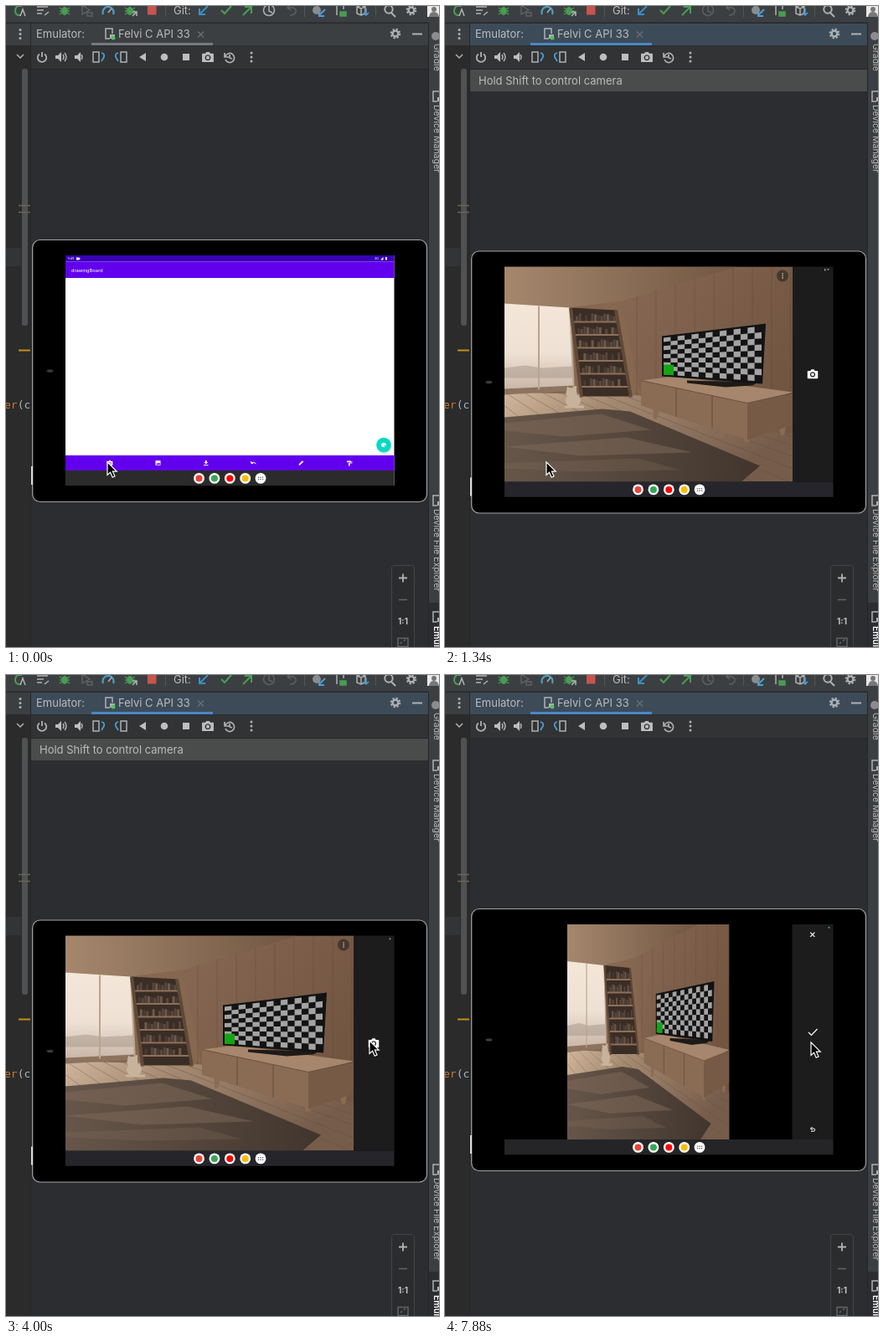
Write an HTML page that moves like this. It is 517 by 766 pixels and loops after 8000 ms.

```html
<!DOCTYPE html>
<html lang="en">
<head>
<meta charset="utf-8">
<title>Emulator camera</title>
<style>
html, body { margin: 0; width: 517px; height: 766px; overflow: hidden; background: #2b2d30 }
svg { display: block; font: 13px Inter, sans-serif }
.line { fill: none; stroke: #afb1b3; stroke-width: 1.5 }
.tiny { font: 4px Roboto, sans-serif; fill: #fff }
.side { font-size: 10.5px; fill: #bbb }
</style>
</head>
<body>
<svg width="517" height="766" viewBox="0 0 517 766">
<defs>
  <linearGradient id="ceilFill" x2="1"><stop stop-color="#a5876d"/><stop offset="1" stop-color="#705642"/></linearGradient>
  <linearGradient id="wallFill" x2="1" y2=".4"><stop stop-color="#8d6f58"/><stop offset=".5" stop-color="#826450"/><stop offset="1" stop-color="#735642"/></linearGradient>
  <linearGradient id="skyFill" x2="0" y2="1"><stop stop-color="#f4e6d8"/><stop offset=".55" stop-color="#eee1d4"/><stop offset="1" stop-color="#c4b2a2"/></linearGradient>
  <linearGradient id="floorFill" x2="1" y2=".4"><stop stop-color="#d0b69b"/><stop offset=".35" stop-color="#a58a72"/><stop offset="1" stop-color="#765d4b"/></linearGradient>
  <linearGradient id="rugFill" x2="1"><stop stop-color="#66564a"/><stop offset="1" stop-color="#41352d"/></linearGradient>
  <clipPath id="frame"><path d="M0 0H344V257H0z"/></clipPath>
  <clipPath id="rugEdge"><path id="rug" d="M0 180L117 170 150 173 305 238 283 257H0z"/></clipPath>

  <g id="gear" fill="none" stroke="#afb1b3">
    <circle r="5.3" stroke-width="2" stroke-dasharray="2.2 1.96"/>
    <circle r="3.4" stroke-width="2.4"/>
  </g>
  <path id="cam" fill-rule="evenodd" d="M-7-5h3.5l1.5-2h4l1.5 2H7q1 0 1 1V6q0 1-1 1H-7q-1 0-1-1V-4q0-1 1-1zM0-3.2a4 4 0 1 0 .01 0zM0-1.6a2.4 2.4 0 1 1-.01 0z"/>
  <g id="phone"><path class="line" d="M3 0V-6H-5V6H0" stroke-width="1.4"/><path d="M0 1h6v5H0z" fill="#afb1b3"/></g>
  <g id="bug" fill="#499c54"><ellipse cy="1" rx="3.6" ry="5"/><path d="M-6-3L6 5M-6 5L6-3M-6 1H6" stroke="#499c54" stroke-width="1.3"/></g>

  <g id="room" clip-path="url(#frame)">
    <path d="M0 0H344V257H0z" fill="url(#wallFill)"/>
    <path d="M0 0H277L140 41 78 49 0 44z" fill="url(#ceilFill)"/>
    <path d="M78 49L140 41 163 156H80z" fill="#86674f"/>
    <g id="planks" stroke="#4f3a2c" stroke-opacity=".22"/>
    <path d="M0 150L163 154 344 200V257H0z" fill="url(#floorFill)"/>
    <g id="boards" stroke="#5d4737" stroke-opacity=".35"/>
    <path d="M0 44L78 49 83 147 0 152z" fill="url(#skyFill)"/>
    <path d="M0 121l25-3 20 3 36-2v14H0z" fill="#aa9b8f" opacity=".55"/>
    <path d="M0 146L83 142V148L0 153z" fill="#8c735f"/>
    <path d="M41 47V147M78 49L83 148" stroke="#b9a48f" stroke-width="2"/>
    <path d="M79 49L133 52 151 155H91z" fill="#3a2d25"/>
    <g id="shelves"/>
    <path d="M79 49L92 156M133 52L151 156" stroke="#5f4938" stroke-width="4"/>
    <g fill="#c7b39c"><ellipse cx="82" cy="160" rx="9" ry="8"/><circle cx="80" cy="151" r="6.5"/><path d="M74 149l1-6 4 3zM81 145l5-3v7zM72 166h23v3H72z"/></g>
    <use href="#rug" fill="url(#rugFill)"/>
    <g clip-path="url(#rugEdge)" fill="#806b5b" opacity=".5">
      <path d="M0 187L115 176 175 195 70 203 0 196zM0 215L145 204 225 222 90 226z"/>
      <path d="M0 235L160 229 210 243 90 245 0 241z" opacity=".6"/>
    </g>
    <path d="M177 164h10l-5 18h-4zM254 183l10 3-3 19h-4zM281 190h16l-5 20h-5zM326 186h11l-3 15h-4z" fill="#8b6b53"/>
    <path d="M163 136L203 131 344 150 290 167z" fill="#a6866c"/>
    <path d="M163 136L290 163V207L163 166z" fill="#8a6b54"/>
    <path d="M290 163L344 151V189L290 207z" fill="#765a46"/>
    <path d="M163 136L290 163 344 151M205 145v34M248 154v39" fill="none" stroke="#614838" stroke-width=".8"/>
    <path d="M218 136l80 2q6 1-3 4l-31 2-46-5z" fill="#1e1a18"/>
    <path d="M188 83L312 68 308 140 188 131z" fill="#131313"/>
    <path id="checker" fill="#a3a3a3"/>
    <path d="M190 117l12 .3V130l-12-1z" fill="#12a612"/>
  </g>
</defs>

<!-- IDE chrome -->
<path d="M0 0H517V766H0z" fill="#2c2d30"/>
<path d="M0 0H517V20H0zM504 20h13V766h-13zM30 21H504V47H30z" fill="#3c3f41"/>
<path id="header" d="M30 21H504V47H30z"/>
<path d="M30 48H504V75H30z" fill="#313335"/>
<path d="M0 20H504M29.5 20V766M504.5 20V766M30 75.5H504" stroke="#252628"/>
<path d="M0 21H29V766H0z" fill="#2b2b2b"/>
<path d="M0 21H29V47H0z" fill="#3c3f41"/>
<path d="M0 289H18V311H0z" fill="#333435"/>
<rect x="19" y="75" width="7" height="307" rx="3" fill="#505152"/>
<path d="M15 238.5H29M15 246.5H29" stroke="#6c6650" stroke-width="1.6"/>
<path d="M15 411.5H29" stroke="#be9117" stroke-width="2"/>
<path class="line" d="M13 58l4 4 4-4"/>
<g id="dots" fill="#afb1b3"><circle cx="17" cy="28.5" r="1.5"/><circle cx="17" cy="33.5" r="1.5"/><circle cx="17" cy="38.5" r="1.5"/></g>
<use href="#dots" x="276" y="27.5"/>
<text x="-2" y="481" fill="#cc7832" style="font:13px 'DejaVu Sans Mono',monospace">er<tspan fill="#a9b7c6">(c</tspan></text>

<!-- main toolbar -->
<g class="line">
  <path d="M19 0H14Q11 2 11 6t4 5h2" stroke="#499c54" stroke-width="2"/><path d="M17 12l3-8 3 8"/>
  <path d="M37 1H50M37 5H45M37 9H43M46 11l5-4"/>
  <path d="M91-1V10l9-5z" stroke="#5d6062"/><path d="M97 8h6v4h-6z" stroke="#5d6062"/>
  <path d="M116 10A6.5 6.5 0 1 1 128 10" stroke="#4a9fc5" stroke-width="2.2"/><path d="M122 8l4-5"/>
  <path d="M241 0L232 9M231 3v7h7" stroke="#3a8fc7" stroke-width="2"/>
  <path d="M257 5l4 4 8-9" stroke="#499c54" stroke-width="2.2"/>
  <path d="M283 11L292 2M285 1h8v8" stroke="#499c54" stroke-width="2"/>
  <g id="clock"><circle cx="314" cy="5" r="6.5"/><path d="M314 0V6l4 2"/></g>
  <path d="M339-2l-3 4 4 3M336 2h6q5 1 4 5-1 4-7 4" stroke="#5d6062"/>
  <path d="M381 4l-7 7M374 6v6h6" stroke="#4a9fd5" stroke-width="2"/>
  <path d="M395 11V-1h8V4"/><path d="M399 7h7v5h-7z" fill="#499c54" stroke="#499c54"/>
  <path d="M419 1l5-2 5 2v8l-5 2-5-2zM419 1l5 2 5-2M424 3v8"/><path d="M430 3v8m-3-3l3 3 3-3" stroke="#4a9fd5"/>
  <circle cx="457" cy="4" r="4.7" stroke-width="2"/><path d="M460 8l5 5" stroke-width="2"/>
  <path d="M190.5 0V13M356.5 0V13M441.5 0V13" stroke="#555" stroke-width="1"/>
</g>
<use href="#bug" x="70" y="5"/><use href="#bug" x="148" y="5"/>
<path d="M151 12l5-5m-5 0h5v5" class="line"/>
<path d="M169 0h10.500v10.500H169z" fill="#c75450"/>
<circle cx="371" cy="5" r="5" fill="#8a8d90"/>
<text x="200" y="10" fill="#bbb">Git:</text>
<use href="#gear" x="484" y="5"/>
<path d="M503 0h14v13h-14z" fill="#e9e9e9"/><circle cx="511" cy="4" r="3" fill="#777"/><path d="M505 13q1-6 6-6t6 6z" fill="#777"/>

<!-- tool window header -->
<g fill="#bbb"><text x="36" y="38">Emulator:</text><text x="134" y="38">Felvi C API 33</text></g>
<use href="#phone" x="124" y="33"/><circle cx="128" cy="38" r="2.5" fill="#4fc45a"/>
<path d="M229 30.500l7 7m0-7l-7 7" class="line" style="stroke:#6e7173;stroke-width:1.2"/>
<path id="underline" d="M102 44H247V47H102z"/>
<use href="#gear" x="465" y="33"/>
<path d="M485 33.500H497" class="line" style="stroke-width:2"/>

<!-- emulator buttons -->
<g class="line">
  <path d="M40 57.500a5.200 5.200 0 1 0 6 0M43 55v6" stroke-width="1.8"/>
  <path d="M68 58q2 3 0 6M70 56q4 5 0 10M90 58q2 3 0 6"/>
  <path d="M104 55h7v12h-7zM137 55h7v12h-7z"/>
  <path d="M114 56q4 1 3 5l-3 5M134 56q-4 1-3 5l3 5" stroke="#4a9fd5" stroke-width="1.8"/>
  <path d="M261 56v5h5M262 60a5.500 5.500 0 1 1 0 4M267 58v4l3 1" stroke-width="1.7"/>
</g>
<g fill="#bcbec0">
  <path d="M59 59h3l4-4v12l-4-4h-3zM82 59h3l4-4v12l-4-4h-3zM159 61l8-5v10z"/>
  <circle cx="189" cy="61" r="4.300"/><path d="M211 57h8v8h-8z"/>
  <use href="#cam" transform="translate(241 61) scale(.87)"/>
</g>
<g id="notice"><path d="M30 76H504V102H30z" fill="#4a4c4b"/><text x="40" y="94" fill="#bbb">Hold Shift to control camera</text></g>

<!-- right tool strip -->
<path d="M505 713h12V766h-12z" fill="#2b2d30"/>
<circle cx="513" cy="36" r="5" fill="#8a8d90"/>
<use href="#phone" x="515" y="108"/><use href="#phone" x="515" y="591"/><use href="#phone" x="515" y="730"/>
<g class="side">
  <text transform="translate(510.500 45) rotate(90)">Gradle</text>
  <text transform="translate(510.500 118) rotate(90)">Device Manager</text>
  <text transform="translate(510.500 601) rotate(90)">Device File Explorer</text>
  <text transform="translate(510.500 741) rotate(90)" fill="#fff" font-weight="600">Emulator</text>
</g>

<!-- zoom panel -->
<rect x="460.500" y="668.500" width="27" height="110" rx="3" fill="#2b2c2e" stroke="#424446"/>
<g class="line"><path d="M469 683.500H479M474 678.500V688.500" stroke-width="1.800"/><path d="M469 709.500H479M468 755.500h12v10h-12zM471 762l2-2m2-1l2-2" stroke="#626466"/></g>
<text x="474" y="739" text-anchor="middle" fill="#c4c4c4" style="font-size:10px;font-weight:700">1:1</text>

<!-- tablet -->
<g id="tablet">
  <rect x="31.700" y="279.500" width="470.800" height="313" rx="9" stroke="#a3a3a3" stroke-width="1.200"/>
  <path d="M30 550h2v22h-2z" fill="#ddd"/>
  <ellipse cx="52.500" cy="436" rx="4" ry="1.800" fill="#3a3a3a"/>
  <g id="app">
    <path d="M71 298H463.500V573H71z" fill="#fff"/>
    <path d="M71 298H463.500V305.500H71z" fill="#3700b3"/>
    <path d="M71 305.500H463.500V325H71zM71 537H463.500V555H71z" fill="#6200ee"/>
    <text x="78" y="317.500" class="tiny" style="font-size:6.100px">drawingBoard</text>
    <text x="73.500" y="303.300" class="tiny">9:49</text><text x="440" y="303.300" class="tiny">3G</text>
    <path d="M84 300.500h3l2 1.500-2 1.500h-3zM447 303.500l3.500-3.500v3.500zM453 300h2v3.500h-2z" fill="#fff"/>
    <circle cx="451.500" cy="526" r="9" fill="#000" opacity=".15"/><circle cx="451" cy="524.500" r="8.800" fill="#03dac5"/>
    <circle cx="451" cy="524.500" r="2.800" fill="#fff"/><circle cx="452.500" cy="525.800" r="1" fill="#03dac5"/>
    <g fill="#fff">
      <use href="#cam" transform="translate(124 546) scale(.42)"/>
      <path d="M178.500 543.300h6v5.400h-6zM236 548.200h5.500v1H236zM238 543h1.600v2h1.600l-2.400 2.500-2.400-2.500h1.600zM349.500 549l.5-2 4-3.800 1.300 1.300-4 4zM407 543.500h5v1.800h-5zM409 546h1.700v3.500H409zM412.500 544h.8v2.500h-3.800v-.8h3z"/>
      <path d="M179.300 548l1.500-2 1 1 1-1.500 1.500 2.500z" fill="#6200ee"/>
      <path d="M293 546q3-2 5.500 1M292.800 544v2.500h2.500" fill="none" stroke="#fff"/>
    </g>
  </g>
  <path id="dark" d="M71 298H463.500V555H71z" fill="#1c1c1c"/>
  <g id="splash"><use href="#cam" transform="translate(267 426) scale(1.060)" fill="#454545"/><path d="M452.500 300h2v3h-2z" fill="#aaa"/></g>
  <g id="preview">
    <use href="#room" transform="translate(71 298)"/>
    <circle cx="403" cy="309" r="7" fill="#3b2f27" opacity=".8"/>
    <path d="M402.500 306h1.200v1.200h-1.200zM402.500 308.400h1.200v1.200h-1.200zM402.500 310.800h1.200v1.200h-1.200z" fill="#fff"/>
    <use href="#cam" transform="translate(439 426.300) scale(.78)" fill="#fff"/>
  </g>
  <g id="review">
    <path d="M71 298H414.500V555H71z"/>
    <use href="#room" transform="translate(146 298) scale(.5625 1)"/>
    <path d="M436.200 307.700l5.200 5.200m0-5.200l-5.200 5.200M434 427l3.500 3.500 7-7.500" fill="none" stroke="#fff" stroke-width="1.200"/>
    <path d="M438.500 540l-2 2 2 2M436.500 542h3.500q1.700 0 1.700 1.600t-1.700 1.600h-3" fill="none" stroke="#fff"/>
  </g>
  <path id="status" d="M453 300.500h1.500v2.500H453zM456.500 300.500h2v1.500h-2z" fill="#9a9a9a"/>
  <circle id="active" cx="458.500" cy="301.800" r="1" fill="#2fbf8a"/>
  <path id="taskbar" d="M71 555H463.500V573.300H71z"/>
  <g id="launcher"/>
</g>
<path id="cursor" d="M0 0V15.500L3.600 12.200 6.200 18.200 9 17 6.400 11.200H11.200z" stroke="#fff" stroke-width="1.200"/>
</svg>
<script>
const $ = id => document.getElementById(id);
const mix = (a, b, k) => a + (b - a) * k;
const range = n => [...Array(n).keys()];

// room details
const corner = (u, v) => [190 + 117 * u, mix(85 - 14 * u, 129 + 8 * u, v)].map(n => n.toFixed(1)).join(' ');
const COLS = 14, ROWS = 9;
let cells = '';
for (const c of range(COLS)) for (const r of range(ROWS)) {
  if ((c + r) % 2) continue;
  const u = c / COLS, v = r / ROWS, u2 = u + 1 / COLS, v2 = v + 1 / ROWS;
  cells += `M${corner(u, v)}L${corner(u2, v)} ${corner(u2, v2)} ${corner(u, v2)}z`;
}
$('checker').setAttribute('d', cells);
$('planks').innerHTML = range(9).map(i => `<path d="M${158 + i * 23} ${35 - i * 6.8}V160"/>`).join('');
$('boards').innerHTML = range(10).map(i => `<path d="M${i * 22 - 20} 151L${120 + i * 44} 257"/>`).join('');
$('shelves').innerHTML = range(6).map(i => {
  const y = 66 + i * 15.5, x = 82 + i * 1.9, w = 52 + i * 1.2;
  const books = range(13).map(b => {
    const h = 7 + (b * 7 + i * 5) % 4, tone = ['#5b493c', '#4a3c35', '#6e5a4a', '#554740'][(b * 3 + i) % 4];
    return (b * 5 + i * 3) % 11 < 9 ? `<path d="M${x + 3 + b * 3.7} ${y}v${-h}h3v${h}z" fill="${tone}"/>` : '';
  }).join('');
  return books + `<path d="M${x} ${y}h${w}" stroke="#8e705a" stroke-width="1.8"/>`;
}).join('');

$('launcher').innerHTML = ['#ea4335', '#34a853', '#ff0000', '#fbbc04'].map((color, i) =>
  `<circle cx="${230.5 + i * 18.4}" cy="564.4" r="6.4" fill="#fff"/><circle cx="${230.5 + i * 18.4}" cy="564.4" r="4" fill="${color}"/>`
).join('') + '<circle cx="304" cy="564.4" r="6.4" fill="#fff"/>' +
  range(6).map(i => `<circle cx="${301.5 + i % 3 * 2.5}" cy="${563.2 + (i > 2) * 2.5}" r=".8" fill="#667"/>`).join('');

// pointer path: time, x, y
const path = [[0, 121, 545], [1490, 121, 545], [2080, 262, 535], [2520, 266, 534], [3100, 456, 441],
  [3700, 434, 437], [4590, 434, 437], [5480, 437, 449], [5780, 437, 452], [6200, 437, 439], [8000, 437, 439]];
function pointer(t) {
  const i = path.findIndex(p => p[0] > t), [a, b] = [path[i - 1], path[i]];
  const k = (t - a[0]) / (b[0] - a[0]);
  return `translate(${mix(a[1], b[1], k)} ${mix(a[2], b[2], k)})`;
}

const show = (id, on) => $(id).style.display = on ? '' : 'none';
const STEP = 147.7;

function draw() {
  const t = performance.now() % 8000;
  const focused = t >= 140, notice = t >= 290 && t < 7880, camera = t >= 440, live = t >= 1340, taken = t >= 4290;
  $('header').style.fill = focused ? '#3d4b59' : '#3c3f41';
  $('underline').style.fill = focused ? '#4a88c7' : '#747a80';
  $('clock').style.stroke = focused ? '#5d6062' : '#afb1b3';
  show('notice', notice);
  $('tablet').setAttribute('transform', `translate(0 ${notice ? 13.5 : 0})`);
  show('app', !camera);
  show('dark', camera);
  show('splash', camera && !live);
  show('preview', live && !taken);
  show('review', taken);
  show('status', live && t < 3400);
  show('active', t >= 3400);
  $('taskbar').style.fill = !camera ? '#2b2b2b' : t < 7880 ? '#25252b' : '#252527';
  $('cursor').setAttribute('transform', pointer(Math.floor(t / STEP) * STEP));
  requestAnimationFrame(draw);
}
draw();
</script>
</body>
</html>
```
